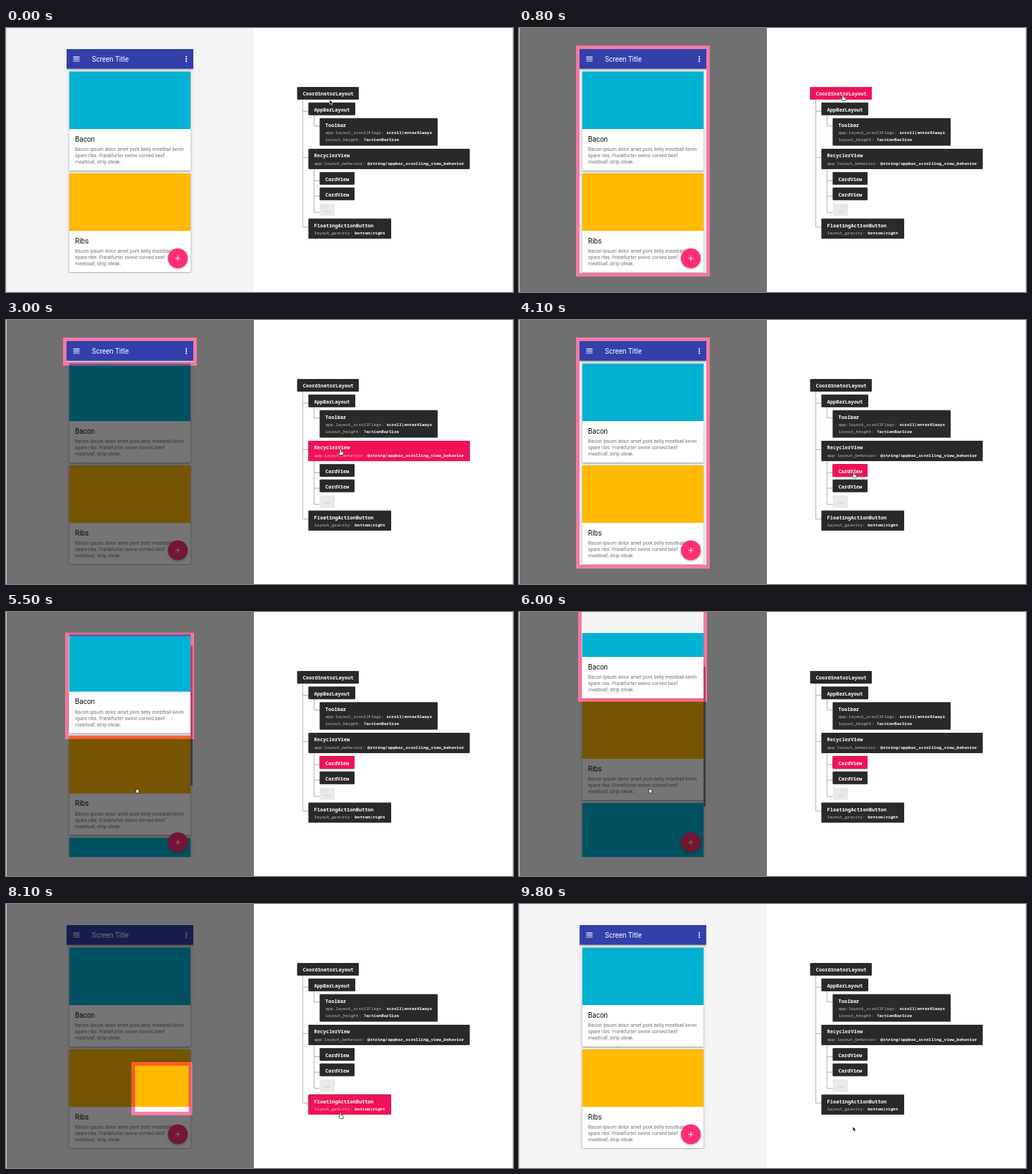
Recreate the animation shown at these times as an HTML page. Size 720 px wide and 376 px high, loop 9.9 s.

```html
<!DOCTYPE html>
<html lang="en">
<head>
<meta charset="utf-8">
<title>Layout inspector</title>
<style>
  html, body { margin: 0; width: 100%; height: 100%; overflow: hidden; background: #fff; }
  svg { display: block; width: 720px; height: 376px; }
  text { font-family: Roboto, sans-serif; white-space: pre; }
  .node text { font: 700 7.05px "Roboto Mono", "Noto Sans Mono", monospace; fill: #fff; }
  .node text.attr { font-size: 6.02px; }
  .node .key { font-weight: 400; fill-opacity: .72; }
  .node { filter: drop-shadow(0 .5px .7px rgba(0, 0, 0, .35)); }
  .card { filter: drop-shadow(0 1px 1px rgba(0, 0, 0, .38)); }
  .title { font-size: 10px; }
  .body { font-size: 7px; fill: #747474; }
  #bar { filter: drop-shadow(0 1px 1.5px rgba(0, 0, 0, .4)); }
  #fab { filter: drop-shadow(0 1.5px 1.5px rgba(0, 0, 0, .35)); }
</style>
</head>
<body>
<svg viewBox="0 0 720 376">
  <defs><clipPath id="screen"><rect x="86" y="30" width="180" height="319"/></clipPath></defs>
  <rect width="352" height="376" fill="#f4f4f4"/>
  <g clip-path="url(#screen)">
    <rect x="86" y="30" width="180" height="319" fill="#eee"/>
    <g id="cards"></g>
    <rect id="thumb" x="262" width="3" fill="#808080"/>
    <g id="bar">
      <rect x="86" y="30" width="180" height="28" fill="#3340ab"/>
      <path d="M95.5 41.4h9M95.5 44.2h9M95.5 47h9" stroke="#fff" stroke-width="1.2"/>
      <text class="title" x="122" y="47.7" fill="#fff">Screen Title</text>
      <g fill="#fff"><circle cx="256" cy="41" r="1.1"/><circle cx="256" cy="44.2" r="1.1"/><circle cx="256" cy="47.4" r="1.1"/></g>
    </g>
    <g id="fab">
      <circle cx="244" cy="328" r="14" fill="#ff2e70"/>
      <path d="M240.5 328h7M244 324.500v7" stroke="#fff" stroke-width="1.1"/>
    </g>
  </g>
  <g id="focus">
    <path id="shade" fill-opacity=".54" fill-rule="evenodd"/>
    <rect id="frame" fill="none" stroke="#f50057" stroke-opacity=".5" stroke-width="5"/>
  </g>
  <rect x="352" width="368" height="376" fill="#fff"/>
  <path d="M.5 0V376M719.5 0V376" stroke="#d4d4d4"/>
  <path d="M421.500 102V283.500H430M421.500 118.500H430M421.500 184.500H430M437.500 124V139.500H446M437.500 201V262.500H446M437.500 217.500H446M437.500 239.500H446"
        fill="none" stroke="#aaa" stroke-width=".9"/>
  <g id="tree"></g>
  <g id="cursor" stroke-linejoin="round">
    <path id="arrow" d="M0 0V6.600L1.500 5.200 2.600 7.700 3.900 7.100 2.800 4.800H4.800Z" fill="#111" stroke="#fff" stroke-width=".6"/>
    <path id="hand" d="M-1 .8a1 1 0 0 1 2 0V3.400L3.500 4.100Q4.300 4.500 4.200 5.500L3.600 8.600H-.8L-3 5.400Q-2.700 4.300-1 5.400Z" fill="#fff" stroke="#333" stroke-width=".8"/>
    <path id="fist" d="M-1.800-2.500H1.200L2.300-1V1.500L1.600 3H-1L-2.300 .8Z" fill="#fff" stroke="#222" stroke-width=".9"/>
  </g>
</svg>
<script>
const LOOP = 9900, STEP = 100, HOVER_FADE = 120;
const MAX_SCROLL = 80, BAR_HEIGHT = 28, FRAME_LAG = 20;
const $ = id => document.getElementById(id);

// Cards of the scrolling list
const cardText = ["Bacon ipsum dolor amet pork belly meatball kevin",
  "spare ribs. Frankfurter swine corned beef", "meatloaf, strip steak."];
const card = (y, color, title) => `<g class="card">
  <rect x="90" y="${y}" width="172" height="141" rx="1" fill="#fff"/>
  <rect x="90" y="${y}" width="172" height="82" fill="${color}"/></g>
  <text class="title" x="98" y="${y + 99.5}" fill="#111">${title}</text>` +
  cardText.map((line, i) => `<text class="body" x="98" y="${y + 113 + i * 9}">${line}</text>`).join("");
$("cards").innerHTML = card(62, "#00b1d2", "Bacon") + card(207, "#ffb900", "Ribs") + card(352, "#00b1d2", "Bacon");

// Tree nodes: x, y, width, height, name, attributes, hover start and end
const nodes = [
  [413.5, 84, 87.5, 18, "CoordinatorLayout", [], 50, 950],
  [429.5, 106.3, 66.5, 18, "AppBarLayout", [], 950, 1900],
  [445.5, 128.5, 167.5, 39, "Toolbar",
    [["app:layout_scrollFlags", "scroll|enterAlways"], ["layout_height", "?actionBarSize"]], 1900, 2780],
  [429.5, 172, 229, 29, "RecyclerView",
    [["app:layout_behavior", "@string/appbar_scrolling_view_behavior"]], 2780, 3560],
  [445.5, 205.3, 49.5, 18, "CardView", [], 3560, 7560],
  [445.5, 227.3, 49.5, 18, "CardView", []],
  [429.5, 271.5, 117.5, 28.5, "FloatingActionButton", [["layout_gravity", "bottom|right"]], 7560, 9150]
];
$("tree").innerHTML = nodes.map(([x, y, w, h, name, attrs]) => {
  const box = `x="${x}" y="${y}" width="${w}" height="${h}" rx="1"`;
  return `<g class="node"><rect ${box} fill="#292929"/><rect class="hot" ${box} fill="#f01257"/>
    <text x="${x + 8}" y="${y + 12.3}">${name}</text>` +
    attrs.map(([key, value], i) => `<text class="attr" x="${x + 8}" y="${y + 22.6 + i * 10.3}"><tspan class="key">${key}: </tspan><tspan>${value}</tspan></text>`).join("") + "</g>";
}).join("") + `<rect x="445.500" y="250" width="21.500" height="17.500" fill="#e9e9e9"/>
  <g fill="#999"><circle cx="453.800" cy="261" r=".6"/><circle cx="456.300" cy="261" r=".6"/><circle cx="458.800" cy="261" r=".6"/></g>`;
const hot = document.querySelectorAll(".hot");

const progress = (t, from, to) => Math.min(1, Math.max(0, (t - from) / (to - from)));
const sine = u => (1 - Math.cos(Math.PI * u)) / 2;

// cubic-bezier(.4, 0, .2, 1)
function standard(x) {
  const curve = (s, a, b) => 3 * s * (1 - s) ** 2 * a + 3 * s * s * (1 - s) * b + s ** 3;
  let low = 0, high = 1;
  for (let i = 0; i < 20; i++) {
    const mid = (low + high) / 2;
    if (curve(mid, .4, .2) < x) low = mid; else high = mid;
  }
  return curve(low, 0, 1);
}

function track(t, start, moves, ease) {
  return moves.reduce((value, [from, to, target]) => {
    const p = ease(progress(t, from, to));
    return value.map((v, i) => v + (target[i] - v) * p);
  }, start);
}

// Outer edges of the focus frame: left, top, right, bottom
const screenBox = [81, 25, 271, 354];
const frameMoves = [
  [1380, 1740, [81, 25, 271, 65]],
  [3190, 3560, screenBox],
  [4090, 4430, [84, 57, 267, 208]],
  [7950, 8300, [225, 309, 263, 347]]
];
const cursorMoves = [
  [50, 300, [460, 95]], [800, 1100, [471, 112.5]], [1820, 2120, [476, 144]],
  [2680, 2980, [475, 184]], [3380, 3700, [475.5, 216.5]], [4630, 4920, [186.5, 255]],
  [6880, 7600, [475, 297]], [9120, 9400, [474, 317]]
];

const scrollAt = t => MAX_SCROLL * (sine(progress(t, 5170, 5950)) - sine(progress(t, 6150, 6625)));

function draw(t) {
  const scroll = scrollAt(t);
  const barHidden = t < 6150 ? Math.min(BAR_HEIGHT, scroll) : Math.max(0, BAR_HEIGHT - (MAX_SCROLL - scroll));
  $("cards").setAttribute("transform", `translate(0 ${-scroll})`);
  $("bar").setAttribute("transform", `translate(0 ${-barHidden - (barHidden >= BAR_HEIGHT ? 4 : 0)})`);

  const top = 58 - barHidden + scroll * .6;
  $("thumb").setAttribute("y", top);
  $("thumb").setAttribute("height", 229 + scroll * .6 - top);
  $("thumb").style.opacity = progress(t, 5130, 5230) - progress(t, 7150, 7450);

  const [x1, y1, x2, y2] = track(t, screenBox, frameMoves, standard);
  const y = y1 - scrollAt(t - FRAME_LAG), w = x2 - x1, h = y2 - y1;
  $("shade").setAttribute("d", `M0 0H352V376H0ZM${x1} ${y}h${w}v${h}h${-w}Z`);
  const frame = { x: x1 + 2.5, y: y + 2.5, width: w - 5, height: h - 5 };
  for (const key in frame) $("frame").setAttribute(key, frame[key]);
  $("focus").style.opacity = sine(progress(t, 300, 650)) - sine(progress(t, 9200, 9600));

  nodes.forEach(([, , , , , , on, off], i) => {
    hot[i].style.opacity = on ? progress(t, on, on + HOVER_FADE) - progress(t, off, off + HOVER_FADE) : 0;
  });

  const [cx, cy] = track(t, [459.5, 102], cursorMoves, sine);
  $("cursor").setAttribute("transform", `translate(${cx} ${cy})`);
  const shape = t >= 4880 && t < 6900 ? "fist"
    : t < 100 || t > 9150 || (t > 4650 && t < 7500) ? "arrow" : "hand";
  for (const id of ["arrow", "hand", "fist"]) $(id).style.display = id === shape ? "" : "none";
}

const began = performance.now();
function tick() {
  const t = (performance.now() - began) % LOOP;
  draw(Math.floor(t / STEP) * STEP);
  requestAnimationFrame(tick);
}
tick();
</script>
</body>
</html>
```
